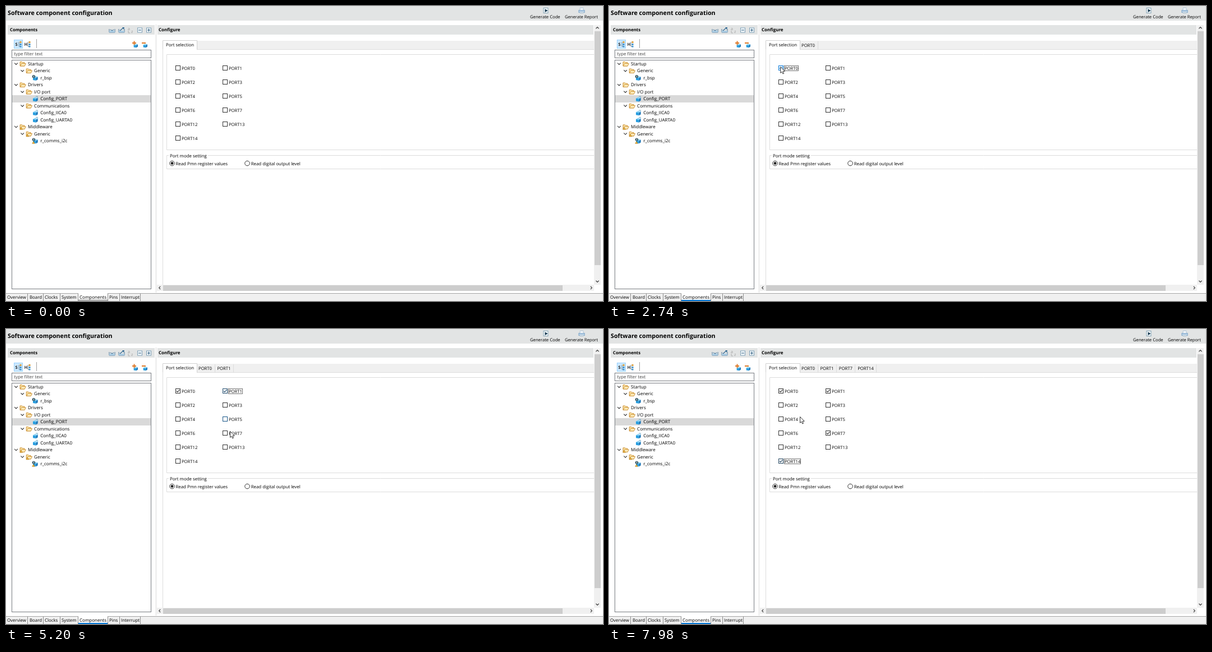
Recreate the animation shown at these times as an HTML page with a canvas. Size 1064x526 px, loop 8000 ms.

```html
<!DOCTYPE html>
<html lang="en">
<head>
<meta charset="utf-8">
<title>Software component configuration</title>
<style>
html, body { margin: 0; width: 100%; height: 100%; overflow: hidden; background: #fff; }
canvas { display: block; width: 1064px; height: 526px; }
</style>
</head>
<body>
<canvas id="stage" width="1064" height="526"></canvas>
<script>
const ctx = document.getElementById('stage').getContext('2d');
const LOOP = 8000;
const FONT = '"Open Sans", "Noto Sans", sans-serif';

// Ports that get clicked: press, release and tab arrival in ms
const clicks = [
  { name: 'PORT0', down: 2380, up: 2540, tab: 2700 },
  { name: 'PORT1', down: 4420, up: 4580, tab: 4680 },
  { name: 'PORT7', down: 5680, up: 5830, tab: 5930 },
  { name: 'PORT14', down: 7240, up: 7390, tab: 7490 }
];
const hovers = {
  PORT0: [2200, 3480], PORT1: [4280, 5040], PORT5: [5020, 5080],
  PORT7: [5240, 6420], PORT14: [6840, 7800]
};
const ports = [0, 1, 2, 3, 4, 5, 6, 7, 12, 13, 14].map((n, i) => ({
  name: 'PORT' + n, x: 302 + (i % 2) * 84, y: 111 + (i >> 1) * 25
}));

const ease = {
  line: k => k,
  both: k => k * k * (3 - 2 * k),
  start: k => k * k,
  stop: k => k * (2 - k)
};
// Pointer path: time, x, y, easing towards this point
const path = [
  [1120, 848, 471], [1230, 577, 308, 'line'], [1490, 577, 308],
  [2000, 281, 104, 'both'], [2050, 281, 104], [2270, 304, 108, 'both'],
  [3110, 306, 108, 'both'], [3450, 352, 107, 'start'], [3640, 372, 105, 'line'],
  [3860, 383, 107, 'stop'], [3990, 383, 107], [4260, 387, 110, 'both'],
  [4500, 387, 109, 'both'], [4800, 388, 107, 'both'], [5200, 399, 182, 'both'],
  [5580, 391, 185, 'both'], [6020, 391, 185], [6370, 352, 207, 'start'],
  [6430, 328, 223, 'line'], [6450, 327, 223, 'line'], [6960, 304, 235, 'stop'],
  [7600, 304, 235], [7980, 340, 156, 'both'], [8000, 340, 156]
];

function pointer(t) {
  if (t < path[0][0]) return null;
  const i = path.findIndex(p => p[0] > t);
  const a = path[i - 1], b = path[i];
  const k = ease[b[3] || 'line']((t - a[0]) / (b[0] - a[0]));
  return [a[1] + (b[1] - a[1]) * k, a[2] + (b[2] - a[2]) * k];
}

function box(x, y, w, h, fill, line, width = 1) {
  if (fill) { ctx.fillStyle = fill; ctx.fillRect(x, y, w, h); }
  if (line) {
    ctx.strokeStyle = line;
    ctx.lineWidth = width;
    ctx.strokeRect(x + .5, y + .5, w - 1, h - 1);
  }
}

function poly(points, fill, line, width = 1, close = true) {
  ctx.beginPath();
  for (let i = 0; i < points.length; i += 2) ctx.lineTo(points[i], points[i + 1]);
  if (close) ctx.closePath();
  if (fill) { ctx.fillStyle = fill; ctx.fill(); }
  if (line) { ctx.strokeStyle = line; ctx.lineWidth = width; ctx.stroke(); }
}

function stroke(points, color, width = 1) { poly(points, null, color, width, false); }

function disc(x, y, r, fill, line) {
  ctx.beginPath();
  ctx.arc(x, y, r, 0, Math.PI * 2);
  if (fill) { ctx.fillStyle = fill; ctx.fill(); }
  if (line) { ctx.strokeStyle = line; ctx.lineWidth = 1; ctx.stroke(); }
}

function text(s, x, y, size = 7.85, color = '#000', weight = 400) {
  ctx.font = `${weight} ${size}px ${FONT}`;
  ctx.fillStyle = color;
  ctx.fillText(s, x, y);
}

function at(x, y, draw) {
  ctx.save();
  ctx.translate(x, y);
  draw();
  ctx.restore();
}

function warning(x, y) {
  poly([x - 2.3, y + 2, x, y - 2, x + 2.3, y + 2], '#f1b53d', '#a7751a', .6);
}

function folder(x, y) {
  at(x, y, () => {
    poly([-5, 4, -5, -3.5, -1.5, -3.5, -.5, -2.3, 3, -2.3, 3, 4], '#fbe3a4', '#c88a2c', .9);
    poly([-4.6, 4, -2.4, -.3, 5.4, -.3, 3.2, 4], '#fff0c0', '#c88a2c', .9);
  });
}

function cube(x, y, s = 1) {
  at(x, y, () => {
    ctx.scale(s, s);
    poly([-4, -1, 1.5, 0, 1.5, 5, -4, 4], '#2a9fe0');
    poly([1.5, 0, 4.6, -2, 4.6, 3, 1.5, 5], '#1470b4');
    poly([-4, -1, -.5, -3, 4.6, -2, 1.5, 0], '#83d0f5');
  });
}

function item(x, y, locked) {
  cube(x, y);
  if (locked) {
    disc(x - 2.6, y - 2.2, 2.7, '#355765');
    box(x - 3, y - 3.8, .9, 3.2, '#fff');
  } else {
    stroke([x + 1, y - 4, x + 4, y - 4.6, x + 4.5, y - 2.5], '#5d9fc2', .9);
  }
}

function arrow(x, y, dx, dy) {
  stroke([x - dx * 1.2 - dy * 2.6, y - dy * 1.2 - dx * 2.6, x + dx * 1.3, y + dy * 1.3,
    x - dx * 1.2 + dy * 2.6, y - dy * 1.2 + dx * 2.6], '#444', 1.2);
}

// Depth, label, marks
const tree = [
  [0, 'Startup'], [1, 'Generic'], [2, 'r_bsp', 'lock'], [0, 'Drivers'], [1, 'I/O port'],
  [2, 'Config_PORT'], [1, 'Communications'], [2, 'Config_IICA0'], [2, 'Config_UARTA0'],
  [0, 'Middleware', 'warn'], [1, 'Generic', 'warn'], [2, 'r_comms_i2c', 'lock warn']
];

function drawTree() {
  box(10, 96, 249, 409, '#fff', '#777b80');
  box(11, 159, 247, 13, '#d9d9d9');
  tree.forEach(([depth, name, marks = ''], i) => {
    const x = 18 + depth * 11.2, y = 103 + i * 12.48;
    const icon = depth < 2 ? x + 12 : 52;
    if (depth < 2) {
      stroke([x - 2.8, y - 1.4, x, y + 1.5, x + 2.8, y - 1.4], '#333', 1.1);
      folder(icon, y);
    } else item(icon, y, marks.includes('lock'));
    if (marks.includes('warn')) warning(icon - 3, y + 3);
    text(name, 39 + depth * 11.1, y + 2.8, 8);
  });
}

function drawToolbar() {
  for (const x of [189, 206]) {
    stroke([x - 5, 41, x - 5, 47, x + 5, 47, x + 5, 41], '#4c7799', 1);
    box(x - 5, 44, 10, 3, '#a9cbe2');
  }
  stroke([186, 42, 189, 44, 192, 42], '#2f6690', 1);
  stroke([203, 44, 209, 39], '#2f6690', 1.1);
  poly([207, 38, 211, 38, 210, 42], '#2f6690');
  text('a', 217, 43, 7, '#999');
  text('z', 223, 47.5, 7, '#999');
  stroke([218, 44, 218, 48, 221, 48], '#aaa', .9);
  for (const x of [238, 254]) {
    box(x - 4, 38.5, 9, 9, '#f2f8fb', '#7f9fb5');
    box(x - 2, 42.5, 5, 1, '#27577a');
  }
  box(254, 40.5, 1, 5, '#27577a');

  box(14, 60, 16, 16, '#cce8ff', '#99d1ff');
  text('S', 16.5, 70.5, 7.5, '#222', 700);
  text('H', 32.5, 70.5, 7.5, '#333', 700);
  for (const x of [22, 38]) {
    stroke([x + 1, 64, x + 1, 72, x + 5, 72], '#5c7180', .8);
    box(x + 2.5, 63, 3, 3, '#d89a35');
    box(x + 2.5, 67, 3, 3, '#3d90ca');
    box(x + 2.5, 71, 3, 2.5, '#3d90ca');
  }
  box(54, 59, 1, 16, '#a0a0a0');
  for (const x of [230, 247]) {
    cube(x + 1, 70, .85);
    box(x - 5, 65, 7, 2, '#df7928');
  }
  box(227.5, 62.5, 2, 7, '#df7928');
}

function drawFrame() {
  box(0, 0, 1064, 526, '#fff');
  box(0, 0, 1064, 26, '#e2e4e4');
  text('Software component configuration', 3, 16, 10.7, '#000', 700);
  box(957.5, 3, 9, 10, '#f7fbfd', '#7f9dae');
  poly([960.5, 5.2, 965.5, 8.2, 960.5, 11.2], '#183b52');
  text('Generate Code', 934, 22, 7.68);
  box(1022.5, 3, 7, 5, '#fff', '#a9bfd1');
  box(1020.5, 7, 11, 5, '#b9d3ea', '#7fa3c4');
  box(1022.5, 10, 7, 3, '#f4f9fd', '#9ab4c8');
  text('Generate Report', 996, 22, 7.62);

  box(3, 34, 262, 17, '#e2e4e4');
  box(270, 34, 777, 17, '#e2e4e4');
  box(266, 33, 3, 478, '#f0f0f0');
  text('Components', 7, 45, 7.75, '#000', 700);
  text('Configure', 272, 45, 7.95, '#000', 700);
  drawToolbar();
  box(10, 78, 249, 15, '#fff', '#777b80');
  text('type filter text', 14.5, 88.2, 7.85, '#444');
  drawTree();

  box(1048, 34, 12, 463, '#f0f0f0');
  box(1049, 45, 11, 417, '#cdcdcd');
  box(269, 497, 779, 11, '#f0f0f0');
  box(280, 498, 712, 10, '#cdcdcd');
  arrow(1054, 39, 0, -1);
  arrow(1054, 491, 0, 1);
  arrow(274, 502.5, -1, 0);
  arrow(1043, 502.5, 1, 0);
}

const sheets = [
  ['Overview', 2, 38], ['Board', 42, 66], ['Clocks', 69, 96], ['System', 99, 128],
  ['Components', 131, 181], ['Pins', 184, 202], ['Interrupt', 205, 239]
];

function drawSheets(t) {
  box(0, 512, 1064, 14, '#f0f0f0');
  box(0, 512, 1064, 1, '#a5a5a5');
  box(129, 512, 52, 14, '#fff');
  for (const [name, x, edge] of sheets) {
    text(name, x, 522, name === 'Components' ? 8 : 7.85);
    box(edge, 513, 1, 13, '#8c8c8c');
  }
  if (t >= clicks[0].down) box(129, 524, 52, 2, '#0078d7');
  else box(129, 524, 52, 1, '#555');
}

function drawTabs(t) {
  box(279, 77, 1, 420, '#dcdcdc');
  box(341, 62, 707, 15, '#f0f0f0');
  box(340, 77, 708, 1, '#dcdcdc');
  stroke([279.5, 77, 279.5, 61.5, 340.5, 61.5, 340.5, 77.5], '#d0d0d0');
  text('Port selection', 285, 72, 7.85);
  clicks.forEach((c, i) => {
    if (t < c.tab) return;
    const x = 343 + i * 33.4;
    text(c.name, x, 72.8, 7.7);
    box(Math.round(x + c.name.length * 4.1 + 8), 63, 1, 14, '#dcdcdc');
  });
}

function hoverAmount(name, t) {
  const h = hovers[name];
  if (!h) return 0;
  return Math.max(0, Math.min(1, (t - h[0]) / 100, 1 - (t - h[1]) / 250));
}

function drawPort(p, t) {
  const k = hoverAmount(p.name, t);
  const color = `rgb(${50 - 50 * k},${50 + 70 * k},${50 + 165 * k})`;
  const i = clicks.findIndex(c => c.name === p.name);
  const c = clicks[i];
  const pressed = c && t >= c.down && t < c.up;
  box(p.x, p.y - 5, 9, 9, pressed ? '#cce4f7' : '#fff', color);
  text(p.name, p.x + 11, p.y + 2.9, 7.67);
  if (!c || t < c.up) return;
  stroke([p.x + 1.8, p.y - .7, p.x + 3.7, p.y + 1.4, p.x + 7.4, p.y - 2.7], color, 1.1);
  const next = clicks[i + 1];
  if (!next || t < next.down) box(p.x + 10, p.y - 5, p.name.length * 4.1 + 5.5, 10, null, '#555', .8);
}

function radio(x, label, tx, on) {
  disc(x, 280.5, 4.3, '#fff', '#333');
  if (on) disc(x, 280.5, 2.4, '#222');
  text(label, tx, 283.5, 7.85);
}

function drawPorts(t) {
  stroke([1048, 86.5, 286.5, 86.5, 286.5, 256.5, 1048, 256.5], '#dcdcdc');
  ports.forEach(p => drawPort(p, t));
  stroke([1048, 266.5, 286.5, 266.5, 286.5, 290.5, 1048, 290.5], '#dcdcdc');
  box(290, 264, 70, 6, '#fff');
  text('Port mode setting', 292, 269.6, 7.9);
  radio(296, 'Read Pmn register values', 302.5, true);
  radio(430, 'Read digital output level', 436.7, false);
}

function drawPointer(t) {
  const p = pointer(t);
  if (!p) return;
  at(p[0], p[1], () => {
    if (clicks.some(c => t >= c.down && t < c.up)) disc(0, 1, 8.6, 'rgba(246,240,50,.68)');
    poly([.5, .5, .5, 11.4, 3, 9.2, 4.7, 13, 6.5, 12.2, 4.9, 8.5, 8.2, 8.3], '#fff', '#222', .9);
  });
}

function draw(t) {
  drawFrame();
  drawTabs(t);
  drawPorts(t);
  drawSheets(t);
  drawPointer(t);
}

let begin = null;
function tick(now) {
  if (begin === null) begin = now;
  draw((now - begin) % LOOP);
  requestAnimationFrame(tick);
}

ctx.textRendering = 'geometricPrecision';
draw(0);
requestAnimationFrame(tick);
</script>
</body>
</html>
```
